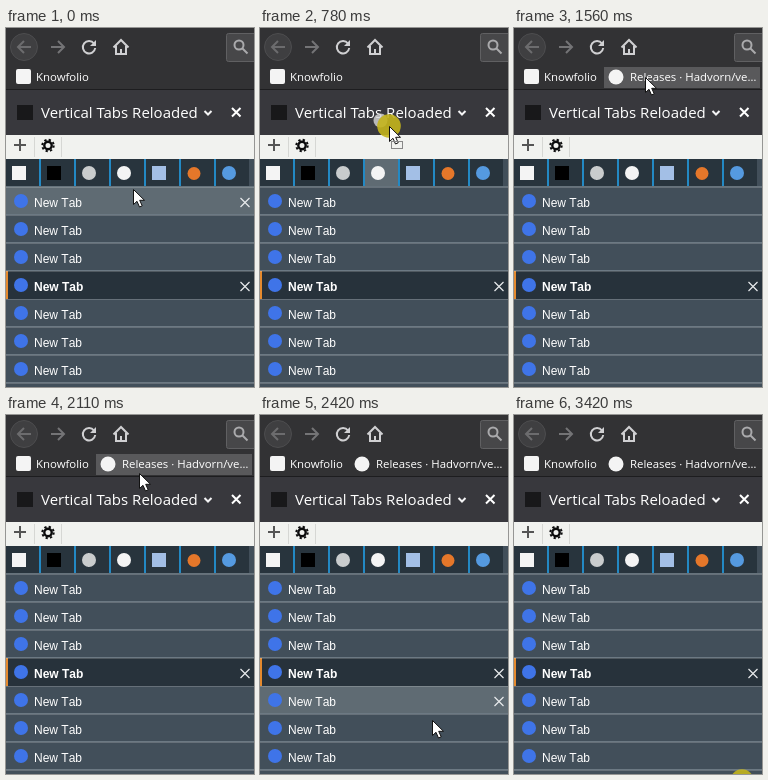
Write an HTML page that moves like this. It is 248 px wide and 359 px high and loops after 3.49 s.

```html
<!DOCTYPE html>
<html lang="en">
<head>
<meta charset="utf-8">
<title>Dragging a tab to the bookmarks bar</title>
<style>
html, body { margin: 0; width: 100%; height: 100%; overflow: hidden; background: #424f5a; }
svg { display: block; }
text { fill: #fff; white-space: pre; }
.ui { font-family: "Open Sans", "Noto Sans", sans-serif; font-size: 11.4px; }
.title { font-size: 15px; }
.tab { font-family: "Liberation Sans", Arial, sans-serif; font-size: 12px; font-kerning: none; }
.line { fill: none; stroke: #d0d0d2; stroke-width: 2; }
.cross { fill: none; stroke: #e8eaec; stroke-width: 1.2; }
</style>
</head>
<body>
<svg width="248" height="359" viewBox="0 0 248 359">
  <rect width="248" height="62" fill="#323234"/>
  <rect y="62" width="248" height="45" fill="#38383d"/>
  <rect y="61" width="248" height="1" fill="#1d1d1f"/>
  <rect y="107" width="248" height="24" fill="#f1f2ef"/>
  <path d="M28.500 109v20M55.500 109v20" stroke="#d6d7d4"/>
  <g id="rows"></g>
  <rect id="hover"/>

  <g class="line">
    <circle cx="18" cy="19" r="13.500" fill="#3f3f41" stroke="#4d4d4f" stroke-width="1"/>
    <path d="M25 19H12M18 13l-6 6 6 6" stroke="#6c6c6e"/>
    <path d="M45 19h13M52 13l6 6-6 6" stroke="#747476"/>
    <path d="M88 15.500A6.200 6.200 0 1 0 89.200 20"/>
    <path d="M90 12v6h-6z" fill="#d0d0d2" stroke="none"/>
    <path d="M107.500 19.500l7.500-7.500 7.500 7.500M110 18v8h10v-8M115 26v-5"/>
    <rect x="220.500" y="5.500" width="40" height="28" rx="2" fill="#474749" stroke="#606062" stroke-width="1"/>
    <circle cx="233" cy="17" r="4.500" stroke="#aaaaac"/>
    <path d="M236.500 20.500l5 5" stroke="#aaaaac"/>
    <path d="M198.500 83l3.500 3.500 3.500-3.500" stroke="#f4f4f5"/>
    <path d="M226 80l8.500 8.500m0-8.500l-8.500 8.500" stroke="#fff"/>
    <path d="M8 117h12M14 111v12" stroke="#555"/>
    <circle cx="42" cy="117.500" r="3.700" stroke="#0c0c0d" stroke-width="2.400"/>
    <circle cx="42" cy="117.500" r="5.700" stroke="#0c0c0d" stroke-dasharray="2.238 2.238"/>
  </g>

  <rect x="11" y="77" width="16" height="15" fill="#18181a"/>
  <text class="ui title" x="35" y="90">Vertical Tabs Reloaded</text>
  <rect x="10" y="41" width="15" height="15" rx="2" fill="#f4f4f4"/>
  <text class="ui" x="30" y="53">Knowfolio</text>
  <g id="bookmark">
    <circle cx="102" cy="49" r="7.500" fill="#f4f4f4"/>
    <text class="ui" x="116" y="53">Releases · Hadvorn/ve…</text>
  </g>
  <g id="labels"></g>
  <path id="close" class="cross" d="M234.500 -4.500l9 9m0-9l-9 9"/>
  <rect id="slot" x="83.500" y="40.500" width="5" height="16" rx="2" fill="#0a7be0" stroke="#f4f8ff"/>

  <g id="pointer">
    <circle id="ghost" cx="-8.500" cy="-5.500" r="7" fill="#d8d8d8" opacity=".8"/>
    <circle id="click" r="11.800" fill="#c4b51c" opacity=".9"/>
    <path d="M.5 .5v15l3.500-3.200 2.500 5.700 2.700-1.200-2.500-5.500h4.800z" fill="#fff" stroke="#111"/>
    <g id="badge" fill="none">
      <rect x="2.500" y="15.500" width="11" height="7" stroke="#222"/>
      <rect x="2.500" y="15.500" width="11" height="7" stroke="#eee" stroke-dasharray="1 1"/>
    </g>
  </g>
</svg>
<script>
const LOOP = 3490, TAB_TOP = 159, TAB_STEP = 28;
const $ = id => document.getElementById(id);
const rect = (x, y, w, h, fill) => `<rect x="${x}" y="${y}" width="${w}" height="${h}" fill="${fill}"/>`;
const dot = (x, y, r, fill) => `<circle cx="${x}" cy="${y}" r="${r}" fill="${fill}"/>`;

// Pinned tabs and the tab list
let rows = rect(0, 131, 243, 27, '#28343d') + rect(0, 158, 248, 1, '#66737c');
let labels = '';
for (let x = 33; x < 243; x += 35) rows += rect(x, 131, 2, 27, '#2389c4');
for (let i = 0; i < 8; i++) {
  const y = TAB_TOP + i * TAB_STEP, active = i === 3;
  rows += active
    ? rect(0, y, 248, 28, '#27323b') + rect(0, y, 2, 28, '#e58a2e')
    : rect(0, y + 27, 248, 1, '#6c7983');
  labels += rect(0, y, 248, 1, '#ffffff30');
  if (i < 7) labels += dot(15, y + 14, 7, '#3f74e8') +
    `<text class="tab" x="28" y="${y + 20}" font-weight="${active ? 700 : 400}">New Tab</text>`;
}
labels += rect(6, 138, 14, 14, '#f4f4f4') + rect(41, 138, 14, 14, '#000') +
  dot(83, 145, 7, '#c9cccd') + dot(118, 145, 7, '#f4f4f4') +
  rect(146, 138, 14, 14, '#a3bfe6') + dot(188, 145.5, 6.5, '#e5772a') + dot(223, 145, 7, '#559ae0') +
  '<path class="cross" d="M234.500 254l9 9m0-9l-9 9"/>';
$('rows').innerHTML = rows;
$('labels').innerHTML = labels;

// Pointer steps: start time, x, y, hovered part (a number is a tab)
const OFF = 500;
const steps = [
  [0, 127, 161, 0], [80, 126, 153, 'pin'], [160, 126, 150, 'pin'],
  [630, 126, 147, 'pin'], [700, 127, 130, 'pin'], [780, 129, 98, 'pin'],
  [860, 131, 70, 'pin'], [930, 132, 54, 'pin'], [1010, 132, 50, 'pin'],
  [1560, 131, 49, 'mark'], [2110, 133, 58, 'mark'], [2190, 142, 118, ''],
  [2260, 155, 193, 0], [2340, 165, 260, 2], [2420, 172, 305, 4],
  [2490, 177, 330, 5], [2570, 181, 352, 6], [2650, OFF, OFF, ''], [3420, 228, 366, '']
];
const spots = { pin: [105, 131, 33, 27, '#5f6b73'], mark: [90, 39, 156, 21, '#59595b'] };
const show = (id, on) => $(id).style.display = on ? '' : 'none';

function draw(now) {
  const t = now % LOOP;
  const [, x, y, part] = steps.findLast(s => s[0] <= t);
  const onTab = typeof part === 'number', tabY = TAB_TOP + part * TAB_STEP;
  const spot = onTab ? [0, tabY, 248, 27, '#5f6b73'] : spots[part];
  show('hover', spot);
  if (spot) ['x', 'y', 'width', 'height', 'fill'].forEach((key, i) => $('hover').setAttribute(key, spot[i]));
  show('close', onTab);
  if (onTab) $('close').setAttribute('transform', `translate(0 ${tabY + 15.5})`);

  const dragging = t >= 700 && t < 1560;
  show('ghost', dragging);
  show('badge', dragging);
  show('slot', dragging && y < 62);
  show('click', t >= 460 && t < 1560 || t >= 3420);
  show('bookmark', t >= 1560);
  $('pointer').setAttribute('transform', `translate(${x} ${y})`);
  requestAnimationFrame(() => draw(performance.now() - start));
}
const start = performance.now();
draw(0);
</script>
</body>
</html>
```
